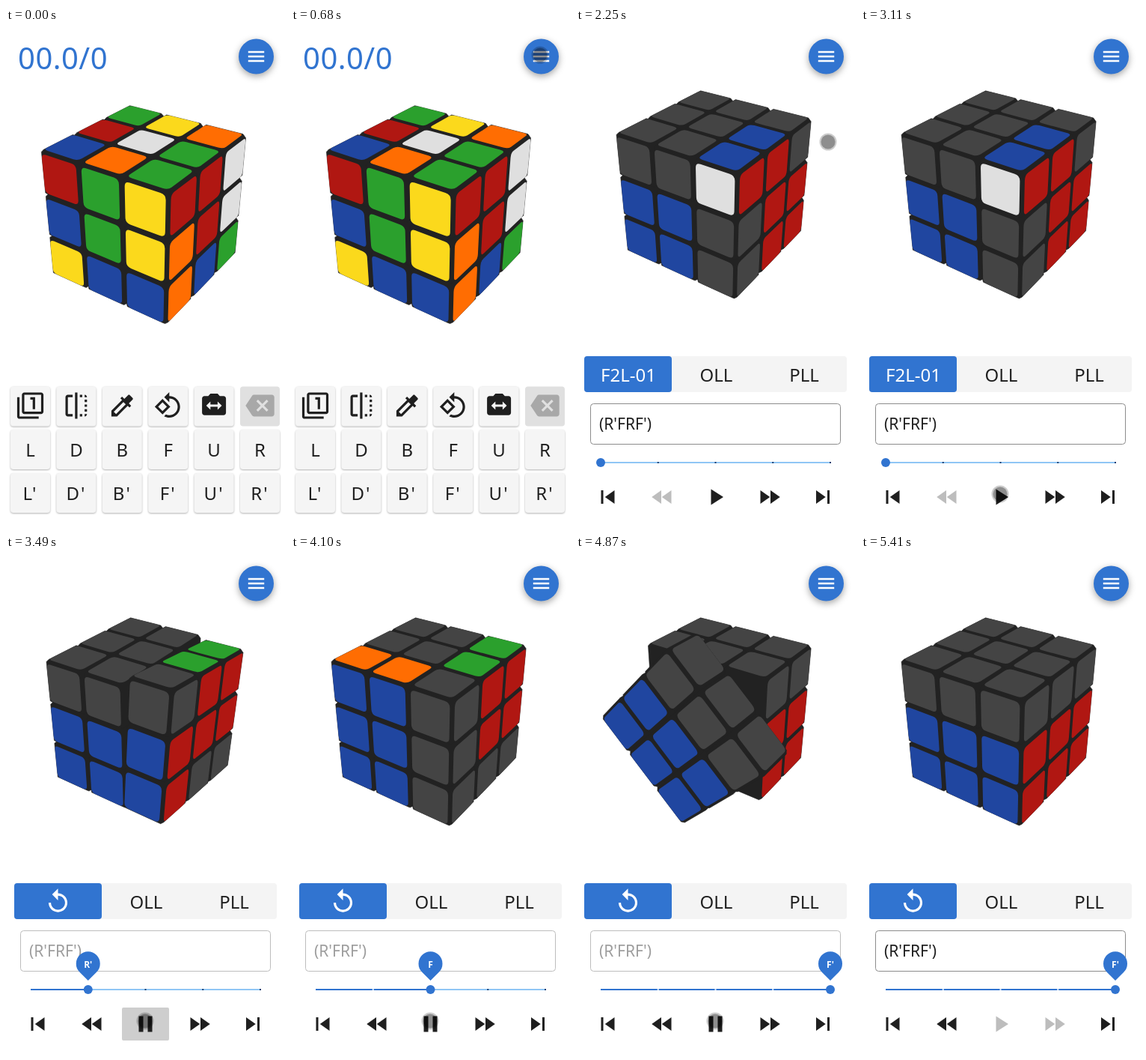
Recreate the animation shown at these times as an HTML page. Size 373 by 666 pixels, loop 5.66 s.

```html
<!DOCTYPE html>
<html lang="en">
<head>
<meta charset="utf-8">
<title>Cube trainer</title>
<style>
  html, body { margin: 0; width: 100%; height: 100%; overflow: hidden; background: #fff; }
  svg { display: block; width: 100vw; height: 100vh; }
  text { font-family: "Noto Sans", "Open Sans", sans-serif; }
  .key { filter: drop-shadow(0 1.5px 1.2px rgba(0,0,0,.3)); }
  .fab { filter: drop-shadow(0 3px 5px rgba(0,0,0,.36)); }
</style>
</head>
<body>
<svg id="stage" viewBox="0 0 373 666"></svg>
<script>
const LOOP = 5660, SWITCH = 2250, DONE = 5140, TURN = 450;
const BLUE = '#3174d0', INK = '#1f1f1f', OFF = '#bdbdbd';

const ICON = {
  menu: 'M3 18h18v-2H3v2zm0-5h18v-2H3v2zm0-7v2h18V6H3z',
  close: 'M19 6.41L17.59 5 12 10.59 6.41 5 5 6.41 10.59 12 5 17.59 6.41 19 12 13.41 17.59 19 19 17.59 13.41 12z',
  school: 'M5 13.18v4L12 21l7-3.82v-4L12 17l-7-3.82zM12 3L1 9l11 6 9-4.91V17h2V9L12 3z',
  tune: 'M3 17v2h6v-2H3zM3 5v2h10V5H3zm10 16v-2h8v-2h-8v-2h-2v6h2zM7 9v2H3v2h4v2h2V9H7zm14 4v-2H11v2h10zm-6-4h2V7h4V5h-4V3h-2v6z',
  code: 'M9.4 16.6L4.8 12l4.6-4.6L8 6l-6 6 6 6 1.4-1.4zm5.2 0l4.6-4.6-4.6-4.6L16 6l6 6-6 6-1.4-1.4z',
  layer: 'M3 5H1v16c0 1.1.9 2 2 2h16v-2H3V5zm11 10h2V5h-4v2h2v8zm7-14H7c-1.1 0-2 .9-2 2v14c0 1.1.9 2 2 2h14c1.1 0 2-.9 2-2V3c0-1.1-.9-2-2-2zm0 16H7V3h14v14z',
  flip: 'M15 21h2v-2h-2v2zm4-12h2V7h-2v2zM3 5v14c0 1.1.9 2 2 2h4v-2H5V5h4V3H5c-1.1 0-2 .9-2 2zm16-2v2h2c0-1.1-.9-2-2-2zm-8 20h2V1h-2v22zm8-6h2v-2h-2v2zM15 5h2V3h-2v2zm4 8h2v-2h-2v2zm0 8c1.1 0 2-.9 2-2h-2v2z',
  picker: 'M20.71 5.63l-2.34-2.34c-.39-.39-1.02-.39-1.41 0l-3.12 3.12-1.93-1.91-1.41 1.41 1.42 1.42L3 16.25V21h4.75l8.92-8.92 1.42 1.42 1.41-1.41-1.92-1.92 3.12-3.12c.4-.4.4-1.03.01-1.42zM6.92 19L5 17.08l8.06-8.06 1.92 1.92L6.92 19z',
  rotate: 'M7.34 6.41L.86 12.9l6.49 6.48 6.49-6.48-6.5-6.49zM3.69 12.9l3.66-3.66L11 12.9l-3.66 3.66-3.65-3.66zm15.67-6.26C17.61 4.88 15.3 4 13 4V.76L8.76 5 13 9.24V6c1.79 0 3.58.68 4.95 2.05 2.73 2.73 2.73 7.17 0 9.9C16.58 19.32 14.79 20 13 20c-.97 0-1.94-.21-2.84-.61l-1.49 1.49C10.02 21.62 11.51 22 13 22c2.3 0 4.61-.88 6.36-2.64 3.52-3.51 3.52-9.21 0-12.72z',
  camera: 'M20 4h-3.17L15 2H9L7.17 4H4c-1.1 0-2 .9-2 2v12c0 1.1.9 2 2 2h16c1.1 0 2-.9 2-2V6c0-1.1-.9-2-2-2zm-5 11.5V13H9v2.5L5.5 12 9 8.5V11h6V8.5l3.5 3.5-3.5 3.5z',
  erase: 'M22 3H7c-.69 0-1.23.35-1.59.88L0 12l5.41 8.11c.36.53.9.89 1.59.89h15c1.1 0 2-.9 2-2V5c0-1.1-.9-2-2-2zm-3 12.59L17.59 17 14 13.41 10.41 17 9 15.59 12.59 12 9 8.41 10.41 7 14 10.59 17.59 7 19 8.41 15.41 12 19 15.59z',
  replay: 'M12 5V1L7 6l5 5V7c3.31 0 6 2.69 6 6s-2.69 6-6 6-6-2.69-6-6H4c0 4.42 3.58 8 8 8s8-3.58 8-8-3.58-8-8-8z',
  first: 'M6 6h2v12H6zm3.5 6l8.5 6V6z',
  rewind: 'M11 18V6l-8.5 6 8.5 6zm.5-6l8.5 6V6l-8.5 6z',
  play: 'M8 5v14l11-7z',
  pause: 'M6 19h4V5H6v14zm8-14v14h4V5h-4z',
  forward: 'M4 18l8.5-6L4 6v12zm9-12v12l8.5-6L13 6z',
  last: 'M6 18l8.5-6L6 6v12zM16 6v12h2V6h-2z'
};

const icon = (name, x, y, scale, fill = INK, id = '') =>
  `<path id="${id}" d="${ICON[name]}" fill="${fill}" transform="translate(${x} ${y}) scale(${scale}) translate(-12 -12)"/>`;
const rect = (x, y, w, h, fill, more = '') =>
  `<rect x="${x}" y="${y}" width="${w}" height="${h}" fill="${fill}" ${more}/>`;
const label = (x, y, size, fill, str, more = 'text-anchor="middle"') =>
  `<text x="${x}" y="${y}" font-size="${size}" fill="${fill}" ${more}>${str}</text>`;
const circle = (x, y, r, fill, more = '') =>
  `<circle cx="${x}" cy="${y}" r="${r}" fill="${fill}" ${more}/>`;

function homeScreen() {
  const tools = ['layer', 'flip', 'picker', 'rotate', 'camera', 'erase'];
  let s = label(16, 55, 40, BLUE, '00.0/0', 'letter-spacing=".5"');
  tools.forEach((tool, i) => {
    const x = 6 + i * 61.4, off = tool === 'erase';
    s += rect(x, 478.5, 53, 53, off ? '#e0e0e0' : '#f5f5f5', `rx="4" ${off ? '' : 'class="key"'}`);
    s += icon(tool, x + 26.5, 504, 1.6, off ? '#a8a8a8' : INK);
    ['', "'"].forEach((mark, row) => {
      const y = 536 + row * 58;
      s += rect(x, y, 53, 53, '#f5f5f5', 'rx="4" class="key"');
      s += label(x + 26.5, y + 36, 24, INK, 'LDBFUR'[i] + mark, `text-anchor="middle" letter-spacing="${row * 2}"`);
    });
  });
  return s;
}

const stop = i => 33 + i * 76.75;

function lessonScreen() {
  let s = rect(11, 438, 351, 48, '#f4f4f4', 'rx="4"') +
    `<path d="M15 438H124a4 4 0 0 1 4 4V482a4 4 0 0 1-4 4H15a4 4 0 0 1-4-4V442a4 4 0 0 1 4-4z" fill="${BLUE}"/>` +
    label(70, 472, 24, '#fff', 'F2L-01', 'id="lesson" font-weight="500" text-anchor="middle"') +
    icon('replay', 69.5, 462.5, 1.57, '#fff', 'replay') +
    label(187.5, 472, 24, INK, 'OLL') + label(305, 472, 24, INK, 'PLL') +
    rect(19.5, 501.5, 334, 54, 'none', 'id="field" rx="4"') +
    label(31, 536, 21, INK, "(R'FRF')", 'id="moves"') +
    rect(33, 579, 307, 2, '#90c6f5') + rect(33, 579, 0, 2, BLUE, 'id="fill"');
  for (let i = 1; i < 5; i++) s += rect(stop(i) - 1, 579, 2, 2, '#1d3f72', `id="mark${i}"`);
  s += `<g id="thumb">${circle(0, 580, 6, BLUE)}</g>` +
    `<g id="tip"><path d="M0 0L-11.3-11.3A16 16 0 1 1 11.3-11.3z" fill="${BLUE}"/>` +
    label(0, -17.5, 12, '#fff', '', 'id="tipText" font-weight="600" text-anchor="middle"') + '</g>' +
    rect(155, 604, 63, 44, '#cecece', 'id="press" rx="2"') +
    icon('first', 42.5, 626, 1.5) + icon('rewind', 115.5, 626, 1.5, INK, 'rewind') +
    icon('play', 186.5, 626, 1.5, INK, 'play') + icon('pause', 186.5, 626, 1.5, INK, 'pause') +
    icon('forward', 258.5, 626, 1.5, INK, 'forward') + icon('last', 330, 626, 1.5);
  return s;
}

function dice() {
  const dots = [[-1, -1], [1, -1], [0, 0], [-1, 1], [1, 1]];
  return rect(-10.5, -10.5, 21, 21, '#d2352f', 'rx="3"') +
    dots.map(([x, y]) => circle(x * 5.4, y * 5.4, 2, '#4a1512')).join('');
}

function menu() {
  const items = [dice(), ...['school', 'tune', 'code'].map(n => icon(n, 0, 0, 1.07, BLUE))];
  return items.map((art, i) => `<g id="item${i}">${circle(0, 0, 21.5, '#fafafa', 'class="fab"')}${art}</g>`).join('') +
    circle(334.5, 38, 23.5, BLUE, 'class="fab"') +
    `<g id="bars">${icon('menu', 0, 0, 1.19, '#fff')}</g><g id="cross">${icon('close', 0, 0, 1.19, '#fff')}</g>`;
}

const stage = document.getElementById('stage');
stage.innerHTML = `<g id="home">${homeScreen()}</g><g id="learn">${lessonScreen()}</g><g id="cube"></g>${menu()}` +
  `<g id="pointer">${circle(0, 0, 11.5, '#000', 'fill-opacity=".2"')}${circle(0, 0, 9.5, '#000', 'fill-opacity=".3"')}</g>`;

const $ = id => document.getElementById(id);
const set = (id, name, value) => $(id).setAttribute(name, value);
const show = (id, on) => set(id, 'display', on ? 'inline' : 'none');
const clamp = v => Math.max(0, Math.min(1, v));
const span = (t, from, len) => clamp((t - from) / len);
const ease = p => p < .5 ? 2 * p * p : 1 - 2 * (1 - p) * (1 - p);

// Cube: x points right, y up, z to the front
const COLOR = { g: '#2ba02d', y: '#fbd91c', o: '#ff6d02', r: '#b01712', w: '#dfdfdf', b: '#2046a0', x: '#444' };
const FACE = {
  U: [1, 1, (r, c) => [c - 1, 1, r - 1]],
  F: [2, 1, (r, c) => [c - 1, 1 - r, 1]],
  R: [0, 1, (r, c) => [1, 1 - r, 1 - c]],
  L: [0, -1, (r, c) => [-1, 1 - r, c - 1]],
  B: [2, -1, (r, c) => [1 - c, 1 - r, -1]],
  D: [1, -1, (r, c) => [c - 1, -1, 1 - r]]
};
const SCRAMBLE = { U: 'gyorwgbog', F: 'rgybgyybb', R: 'rrworwobg' };
const LESSON = { U: 'xxxxxbxxb', F: 'xxwbbxbbx', R: 'rrxxrrxrr', L: 'xxxoooooo', B: 'xxxgggggg', D: 'wwxwwwwww' };
const TURNS = [
  { name: "R'", axis: 0, dir: 1, at: 3120 },
  { name: 'F', axis: 2, dir: -1, at: 3615 },
  { name: 'R', axis: 0, dir: -1, at: 4110 },
  { name: "F'", axis: 2, dir: 1, at: 4640 }
];

const YAW = 34.4 * Math.PI / 180, PITCH = 30.5 * Math.PI / 180, NEAR = .12;
const sy = Math.sin(YAW), cy = Math.cos(YAW), sp = Math.sin(PITCH), cp = Math.cos(PITCH);
const eye = [sy * cp, sp, cy * cp].map(v => v / NEAR);
const depth = p => p[1] * sp + (p[0] * sy + p[2] * cy) * cp;

function spin(p, axis, angle) {
  const a = (axis + 1) % 3, b = (axis + 2) % 3, q = [...p];
  q[a] = p[a] * Math.cos(angle) - p[b] * Math.sin(angle);
  q[b] = p[a] * Math.sin(angle) + p[b] * Math.cos(angle);
  return q;
}

function stickers(state) {
  const list = [];
  for (const f in state) {
    const [axis, sign, place] = FACE[f];
    [...state[f]].forEach((color, i) => {
      const n = [0, 0, 0];
      n[axis] = sign;
      list.push({ p: place(Math.floor(i / 3), i % 3), n, color });
    });
  }
  return list;
}

function hull(points) {
  points.sort((a, b) => a[0] - b[0] || a[1] - b[1]);
  const half = list => {
    const out = [];
    for (const p of list) {
      while (out.length > 1) {
        const [a, b] = out.slice(-2);
        if ((b[0] - a[0]) * (p[1] - a[1]) - (b[1] - a[1]) * (p[0] - a[0]) > 0) break;
        out.pop();
      }
      out.push(p);
    }
    return out.slice(0, -1);
  };
  return [...half(points), ...half([...points].reverse())];
}

const fix = p => p[0].toFixed(2) + ' ' + p[1].toFixed(2);
const UNIT = 1 / 3, BODY = .288, TILE = .291, ROUND = .075;

const shell = [];
for (let axis = 0; axis < 3; axis++)
  for (let bits = 0; bits < 8; bits++)
    shell.push([0, 1, 2].map(i => (bits >> i & 1 ? 1 : -1) * (i === axis ? UNIT : BODY)));

function drawCube(state, turns, midY, size) {
  const view = p => {
    const h = p[0] * sy + p[2] * cy, w = 1 - NEAR * depth(p);
    return [187.3 + size * (p[0] * cy - p[2] * sy) / w, midY - size * (p[1] * cp - h * sp) / w];
  };
  const tiles = stickers(state);
  let axis = 0, angle = 0;
  for (const turn of turns) {
    const full = turn.dir * Math.PI / 2;
    if (turn.progress < 1) { axis = turn.axis; angle = full * turn.progress; break; }
    for (const tile of tiles) if (tile.p[turn.axis] === 1) {
      tile.p = spin(tile.p, turn.axis, full).map(Math.round);
      tile.n = spin(tile.n, turn.axis, full).map(Math.round);
    }
  }
  const move = c => p => c[axis] === 1 ? spin(p, axis, angle) : p;
  const cubies = [];
  for (let i = 0; i < 27; i++) cubies.push([i % 3 - 1, Math.floor(i / 3) % 3 - 1, Math.floor(i / 9) - 1]);
  cubies.sort((a, b) => a[axis] - b[axis] || depth(move(a)(a)) - depth(move(b)(b)));

  let out = '';
  for (const c of cubies) {
    const place = move(c), mid = c.map(v => v * 2 / 3);
    const at = d => view(place(mid.map((v, i) => v + d[i])));
    out += `<path d="M${hull(shell.map(at)).map(fix).join('L')}z" fill="#222" stroke="#222" stroke-width=".6" stroke-linejoin="round"/>`;
    for (const { p, n, color } of tiles) {
      if (p.some((v, i) => v !== c[i])) continue;
      const normal = place(n), face = place(mid.map((v, i) => v + n[i] * UNIT));
      if (normal.reduce((s, v, i) => s + v * (eye[i] - face[i]), 0) <= 0) continue;
      const k = n.findIndex(v => v), a = (k + 1) % 3, b = (k + 2) % 3;
      const spot = (u, v) => {
        const d = n.map(x => x * UNIT);
        d[a] = u; d[b] = v;
        return fix(at(d));
      };
      const inner = TILE - ROUND;
      const path = [[-1, -1], [1, -1], [1, 1], [-1, 1]].map(([u, v]) => {
        const ends = [spot(u * inner, v * TILE), spot(u * TILE, v * inner)];
        if (u === v) ends.reverse();
        return `${ends[0]}Q${spot(u * TILE, v * TILE)} ${ends[1]}`;
      });
      out += `<path d="M${path.join('L')}z" fill="${COLOR[color]}"/>`;
    }
  }
  $('cube').innerHTML = out;
}

// Touch point stops: time, x, y
const TRAIL = [[70, 380, 406], [500, 333, 36], [850, 333, 36], [1190, 332, 101], [1310, 332, 102],
  [1790, 337, 152], [2640, 337, 152], [2990, 186, 622], [5150, 186, 622], [5400, 348, 682]];

function drawPointer(t) {
  const i = TRAIL.findIndex(k => k[0] > t);
  show('pointer', i > 0);
  if (i < 1) return;
  const [t0, x0, y0] = TRAIL[i - 1], [t1, x1, y1] = TRAIL[i];
  const p = ease(span(t, t0, t1 - t0));
  set('pointer', 'transform', `translate(${x0 + (x1 - x0) * p} ${y0 + (y1 - y0) * p})`);
}

function drawMenu(t) {
  const live = t < SWITCH, open = live ? ease(span(t, 690, 200)) : 0;
  set('bars', 'transform', `translate(334.5 38) rotate(${open * 45})`);
  set('bars', 'opacity', 1 - open);
  set('cross', 'transform', `translate(334.5 38) rotate(${open * 90 - 90})`);
  set('cross', 'opacity', open);
  for (let i = 0; i < 4; i++) {
    const grow = live ? ease(span(t, 720 + i * 30, 200)) : 0;
    show('item' + i, grow > 0);
    set('item' + i, 'transform', `translate(334.5 ${104.5 + i * 54}) scale(${grow})`);
  }
}

function drawLesson(t) {
  const step = TURNS.filter(m => t >= m.at).length;
  const busy = step > 0 && t < DONE, ended = t >= DONE;
  show('lesson', !step);
  show('replay', step);
  set('field', 'stroke', busy ? '#bdbdbd' : '#8c8c8c');
  set('moves', 'fill', busy ? '#9e9e9e' : INK);
  const pos = TURNS.reduce((s, m) => s + ease(span(t, m.at, 120)), 0), x = stop(pos);
  set('fill', 'width', x - 33);
  set('thumb', 'transform', `translate(${x} 0)`);
  for (let i = 1; i < 5; i++) set('mark' + i, 'fill', i <= pos ? '#d5e6fa' : '#1d3f72');
  show('tip', step);
  set('tip', 'transform', `translate(${x} 568) scale(${ease(span(t, TURNS[0].at, 150))})`);
  $('tipText').textContent = step ? TURNS[step - 1].name : '';
  set('press', 'opacity', span(t, 3220, 80) * (1 - span(t, 3580, 150)));
  show('play', !busy);
  show('pause', busy);
  set('rewind', 'fill', step ? INK : OFF);
  set('play', 'fill', ended ? OFF : INK);
  set('forward', 'fill', ended ? OFF : INK);
}

let scene = '';
function draw(t) {
  const home = t < SWITCH;
  show('home', home);
  show('learn', !home);
  const turns = home ? [] : TURNS.map(m => ({ ...m, progress: ease(span(t, m.at, TURN)) }));
  const key = home + turns.map(m => m.progress).join();
  if (key !== scene) {
    scene = key;
    if (home) drawCube(SCRAMBLE, turns, 238, 94.2);
    else drawCube(LESSON, turns, 211.8, 89.7);
  }
  if (!home) drawLesson(t);
  drawMenu(t);
  drawPointer(t);
}

const start = performance.now();
function frame() {
  draw((performance.now() - start) % LOOP);
  requestAnimationFrame(frame);
}
frame();
</script>
</body>
</html>
```
